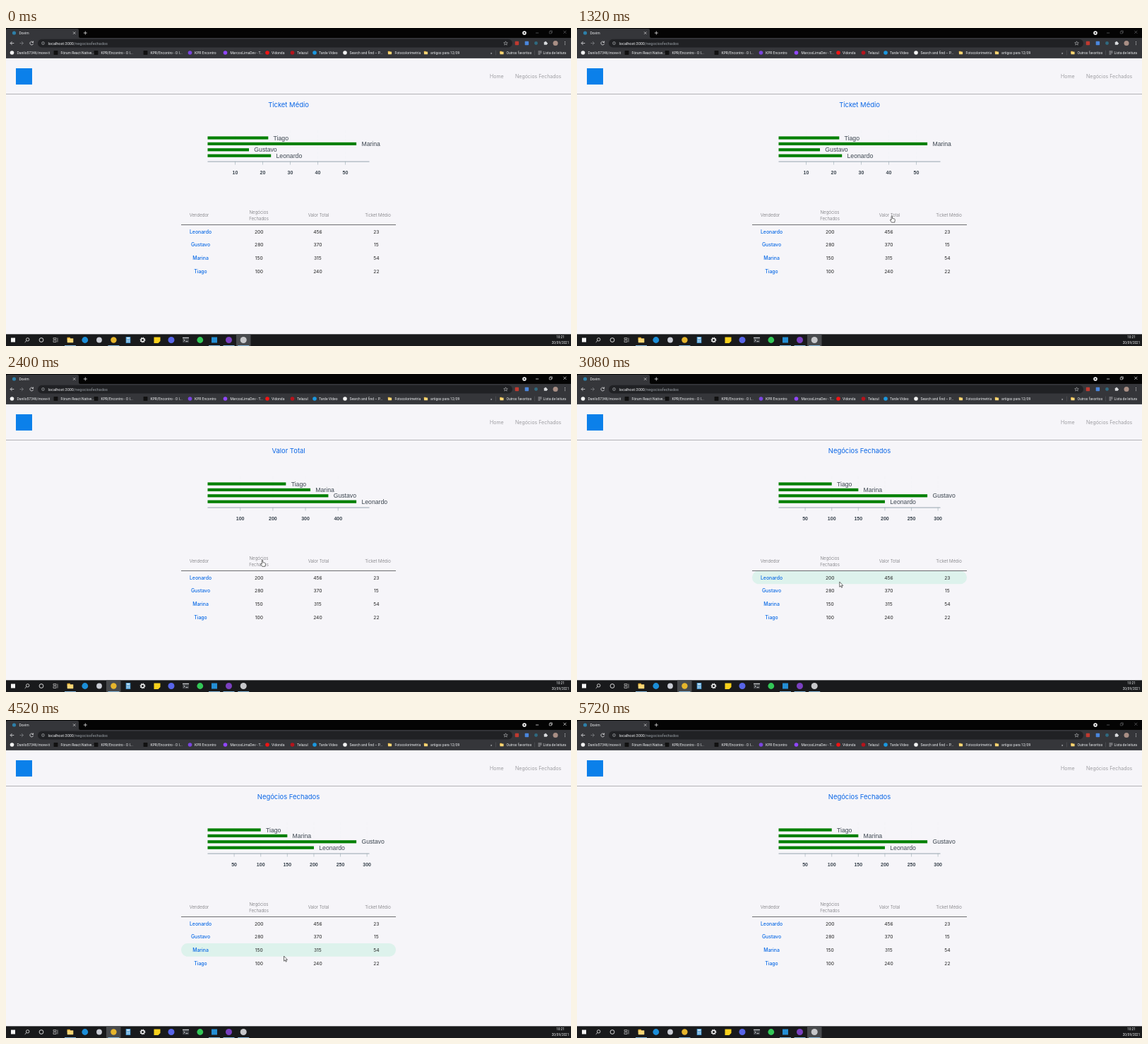
Animation of 800 by 450 pixels, one loop 5.76 s. Source, as an HTML page:

```html
<!DOCTYPE html>
<html lang="pt">
<head>
<meta charset="utf-8">
<title>Dovim</title>
<style>
  html, body { margin: 0; width: 100%; height: 100%; overflow: hidden; background: #f6f5f9; }
  svg { display: block; width: 800px; height: 450px; }
  text { white-space: pre; }
  .ui { font: 5px Roboto, sans-serif; fill: #eceef0; }
  .page { font-family: Inter, sans-serif; }
  .title { font-size: 9.45px; fill: #0a66e6; }
  .nav { font-size: 7.05px; font-weight: 300; fill: #86868a; }
  .head { font-size: 6.1px; font-weight: 300; fill: #707074; }
  .seller { font-size: 6.9px; font-weight: 500; fill: #0a6ae6; }
  .cell { font-size: 6.7px; fill: #222; }
  .label { font: 8.7px "Liberation Sans", Arial, sans-serif; fill: #3c4650; }
  .tick { font: bold 7px "Liberation Sans", Arial, sans-serif; fill: #3c4650; }
  .mid { text-anchor: middle; }
</style>
</head>
<body>
<svg id="stage" viewBox="0 0 800 450"></svg>
<script>
const NS = 'http://www.w3.org/2000/svg';
const LOOP = 5760;
const PAGE_TOP = 42.9, PAGE_END = 433.3;
const stage = document.getElementById('stage');

function add(parent, tag, attrs = {}, text) {
  const node = document.createElementNS(NS, tag);
  for (const key in attrs) node.setAttribute(key, attrs[key]);
  if (text !== undefined) node.textContent = text;
  parent.appendChild(node);
  return node;
}
const group = (parent = stage) => add(parent, 'g');
const rect = (p, x, y, width, height, fill, rx = 0) => add(p, 'rect', { x, y, width, height, fill, rx });
const dot = (p, cx, cy, r, fill) => add(p, 'circle', { cx, cy, r, fill });
const ring = (p, cx, cy, r, stroke, w = 0.8) =>
  add(p, 'circle', { cx, cy, r, fill: 'none', stroke, 'stroke-width': w });
const line = (p, d, stroke, w = 0.8) => add(p, 'path', { d, fill: 'none', stroke, 'stroke-width': w });
const write = (p, x, y, cls, text) => add(p, 'text', { x, y, class: cls }, text);
const show = (node, on) => { node.style.display = on ? '' : 'none'; };

function folder(p, x, y, s) {
  rect(p, x - s, y - s * 0.85, s, s, '#e0a92e', 0.4);
  rect(p, x - s, y - s * 0.55, s * 2, s * 1.4, '#f9d675', 0.4);
}

// Browser window
function drawTabs() {
  rect(stage, 0, 0, 800, 15, '#040404');
  rect(stage, 0, 14, 800, 30, '#35363a');
  add(stage, 'path', { d: 'M0 14V3Q0 1 2 1H101Q103 1 103 3V12Q103 14 105 14Z', fill: '#35363a' });
  dot(stage, 11.5, 7, 2.6, '#2d7fa8');
  write(stage, 18.5, 8.9, 'ui', 'Dovim');
  line(stage, 'M95 5.4l3.4 3.4M98.4 5.4l-3.4 3.4', '#d8d8da', 0.7);
  line(stage, 'M109.8 7h5M112.3 4.5v5', '#ddd');
  dot(stage, 734, 7, 2.8, '#eee');
  dot(stage, 734, 7, 1, '#111');
}

function drawToolbar() {
  rect(stage, 45, 15.8, 672, 11.7, '#202124', 5.8);
  line(stage, 'M11.3 21.5h-5M8.6 19l-2.5 2.5 2.5 2.5', '#e2e3e5');
  line(stage, 'M19.5 21.5h5M22 19l2.5 2.5-2.5 2.5', '#7d7f83');
  line(stage, 'M38.3 20.2a2.4 2.4 0 1 0 .3 2M38.6 18.5v2h-2', '#e2e3e5');
  ring(stage, 52.5, 21.5, 2, '#b4b7bb', 0.6);
  line(stage, 'M52.5 21.2v1.3M52.5 20.1v.5', '#b4b7bb', 0.6);
  const url = add(stage, 'text', { x: 59.5, y: 23.6, class: 'ui', style: 'font-size:5.55px' });
  add(url, 'tspan', {}, 'localhost:3000');
  add(url, 'tspan', { fill: '#9aa0a6' }, '/negociosfechados');
  line(stage, 'M707.5 18.8l.8 1.9 2 .1-1.6 1.3.6 2-1.8-1.1-1.8 1.1.6-2-1.6-1.3 2-.1z', '#d0d2d5', 0.5);
  rect(stage, 720.7, 18.8, 5.4, 5.4, '#bf3a30', 1);
  rect(stage, 734.7, 18.8, 5.4, 5.4, '#4a86dc', 0.8);
  dot(stage, 750.5, 21.5, 2.4, '#2f6a80');
  rect(stage, 761.8, 19.8, 4.2, 4, '#d8dadd', 0.5);
  dot(stage, 764, 19.6, 0.9, '#d8dadd');
  dot(stage, 766.2, 21.8, 0.9, '#d8dadd');
  dot(stage, 778, 21.5, 3.5, '#a98f85');
  for (const y of [19.5, 21.5, 23.5]) dot(stage, 791.5, y, 0.55, '#dcdde0');
}

function drawBookmarks() {
  const marks = [
    [8.5, '#f2f2f2', 'Danilo57346/move-it', 15.5],
    [70.5, '#111', 'Fórum React Native...', 77.5],
    [127.5, '#111', 'KPR/Encontro - O I...', 134.5],
    [197.5, '#111', 'KPR/Encontro - O I...', 204.5],
    [260.5, '#7a45e0', 'KPR Encontro', 267],
    [310.5, '#9146ff', 'MarcosLimaDev - T...', 317.5],
    [370, '#f01414', 'Vidonda', 376],
    [405.5, '#b5141c', 'Telazul', 412],
    [437, '#1a98e0', 'Tarde Vídeo', 443],
    [480, '#f2f2f2', 'Search and find – P...', 486.5],
    [543.5, 0, 'Fotocolorimetria', 550.5],
    [594.5, 0, 'artigos para 12/09', 601],
    [702, 0, 'Outros favoritos', 708.5]
  ];
  for (const [x, color, name, tx] of marks) {
    if (!color) folder(stage, x, 35, 2.6);
    else if (color === '#111') rect(stage, x - 2.9, 32.1, 5.8, 5.8, color, 0.5);
    else dot(stage, x, 35, 2.8, color);
    write(stage, tx, 36.8, 'ui', name);
  }
  write(stage, 686, 36.8, 'ui', '»');
  line(stage, 'M693.5 31.5v7M748.5 31.5v7', '#5d5e62', 0.5);
  line(stage, 'M753.5 33h5M753.5 35h5M753.5 37h3', '#d8dadd', 0.7);
  write(stage, 760.5, 36.8, 'ui', 'Lista de leitura');
}

function drawButtons(color) {
  const g = group();
  line(g, 'M750 7h4.2M789.3 3.8l4 4M793.3 3.8l-4 4', color, 0.7);
  line(g, 'M769.3 4.9h3v3h-3zM770.3 4.9v-1h3v3h-1', color, 0.6);
  return g;
}

// Page
const SELLERS = [
  ['Leonardo', 200, 456, 23],
  ['Gustavo', 280, 370, 15],
  ['Marina', 150, 315, 54],
  ['Tiago', 100, 240, 22]
];
const COLS = [275.5, 358.3, 441.4, 524.4];
const ROW_TOP = 279, ROW_H = 18.75;

function drawHeader() {
  rect(stage, 0, PAGE_TOP, 800, PAGE_END - PAGE_TOP, '#f6f5f9');
  rect(stage, 14, 57, 23, 23, '#0b80ea');
  write(stage, 685, 70.8, 'page nav', 'Home');
  write(stage, 721, 70.8, 'page nav', 'Negócios Fechados');
  rect(stage, 0, 93.1, 800, 0.8, '#a3a3a6');
}

function drawTable() {
  const heads = [[273.5, 267.2, 'Vendedor'], [358, 263.2, 'Negócios'], [358, 271.9, 'Fechados'],
    [442.5, 267.2, 'Valor Total'], [526.5, 267.2, 'Ticket Médio']];
  for (const [x, y, name] of heads) write(stage, x, y, 'page head mid', name);
  const hover = rect(stage, 248, 0, 304, ROW_H, '#ddf2ec', 9.2);
  rect(stage, 248, 278.1, 304, 0.8, '#4c4c4e');
  SELLERS.forEach((row, i) => row.forEach((value, c) =>
    write(stage, COLS[c], 290.5 + i * ROW_H, 'page mid ' + (c ? 'cell' : 'seller'), value)));
  return hover;
}

function drawChart(title, col, step, count) {
  const g = group();
  const left = 285.5;
  const scale = 210.6 / Math.max(...SELLERS.map(row => row[col]));
  write(g, 400, 111.5, 'page title mid', title);
  for (let i = 1; i <= count; i++) {
    const x = left + i * step * scale;
    line(g, `M${x} 145V189`, '#f1f2f5', 0.5).setAttribute('stroke-dasharray', '4 2');
    line(g, `M${x} 189v4.5`, '#9aabb4', 0.6);
    write(g, x, 206.9, 'tick mid', i * step);
  }
  rect(g, left, 188.6, 229, 0.9, '#8c9ca6');
  SELLERS.forEach((row, i) => {
    const y = 180.7 - i * 8.4, w = row[col] * scale;
    rect(g, left, y - 2.1, w, 4.2, '#008000');
    write(g, left + w + 7.3, y + 3.1, 'label', row[0]);
  });
  return g;
}

// Taskbar
function drawTaskbar() {
  rect(stage, 0, PAGE_END, 800, 17, '#191a1c');
  const browserOn = rect(stage, 142, PAGE_END, 20.5, 17, '#484a4d');
  const recorderOn = rect(stage, 326, PAGE_END, 20.5, 17, '#484a4d');
  for (const x of [91, 152.4, 295, 315.5, 336.2]) rect(stage, x - 8, 449, 16, 1, '#86b8dc');

  rect(stage, 7, 438.5, 6, 6, '#f4f4f4');
  ring(stage, 30.7, 440.8, 2.2, '#eee');
  line(stage, 'M29 442.5l-2.3 2.3', '#eee');
  ring(stage, 50, 441.5, 2.9, '#eee', 0.9);
  line(stage, 'M67 438.5h4v2h-4zM67 442h4v2.5h-4zM73 438.5v6', '#ddd', 0.6);
  folder(stage, 91, 441.5, 4.3);
  dot(stage, 111.8, 441.5, 4.4, '#1c8ed8');
  dot(stage, 132, 441.5, 3.9, '#c9ccd4');
  dot(stage, 152.4, 441.5, 4.2, '#e6b52c');

  rect(stage, 169.7, 437, 6.6, 9, '#4596cf', 0.5);
  rect(stage, 170.7, 438, 4.6, 1.7, '#e4f2fb');
  for (const y of [441, 443.2])
    for (const x of [170.7, 172.4, 174.1]) rect(stage, x, y, 1.2, 1.3, '#e4f2fb');
  ring(stage, 193.5, 441.5, 2.3, '#f0f0f0', 1.4);
  ring(stage, 193.5, 441.5, 3.4, '#f0f0f0', 1.1).setAttribute('stroke-dasharray', '1.34 1.33');
  add(stage, 'path', { d: 'M209.5 437.5h9v5.5l-3 3h-6z', fill: '#f8d11c' });
  dot(stage, 234, 441.5, 4.5, '#5865e8');
  rect(stage, 250, 437.8, 9, 7.5, '#3c3f43', 0.6);
  rect(stage, 250, 437.8, 9, 1.2, '#c8cacd');
  line(stage, 'M251.5 440.4l1.6 1.5-1.6 1.5M254.5 443.6h3', '#fff', 0.7);
  dot(stage, 274.8, 441.5, 4.4, '#33c757');
  rect(stage, 291, 437.5, 8, 8, '#248ed4');
  dot(stage, 315.5, 441.5, 4.5, '#7a40c0');
  dot(stage, 336.2, 441.5, 4.5, '#c6c7ca');
  const clock = { class: 'ui mid', style: 'font-size:4.65px', x: 785 };
  add(stage, 'text', { ...clock, y: 439.2 }, '10:21');
  add(stage, 'text', { ...clock, y: 447.2 }, '20/09/2021');
  return { browserOn, recorderOn };
}

function drawPointer(d) {
  const g = group();
  add(g, 'path', { d, fill: '#fff', stroke: '#222', 'stroke-width': 0.65, 'stroke-linejoin': 'round' });
  return g;
}

drawTabs();
drawToolbar();
drawBookmarks();
const dimButtons = drawButtons('#66676a');
const litButtons = drawButtons('#f4f4f4');
drawHeader();
const charts = [
  drawChart('Ticket Médio', 3, 10, 5),
  drawChart('Valor Total', 2, 100, 4),
  drawChart('Negócios Fechados', 1, 50, 6)
];
const hover = drawTable();
const bar = drawTaskbar();
const arrow = drawPointer('M0 0V7.2L1.7 5.7 2.8 8.2 3.9 7.7 2.8 5.3H5Z');
const hand = drawPointer('M-.7 .6Q0-.4 .7 .6V3.6L3.6 4.3Q4.6 4.6 4.5 5.7L3.9 9.3H-.3L-2.4 6.2Q-2.4 5.2-1.5 5.4L-.7 6.1Z');

// Pointer stops: time, x, y
const PATH = [
  [0, 752, 462], [120, 752, 462], [520, 719.5, 253.5], [680, 719.5, 253.5],
  [1280, 445.8, 265.8], [1840, 445.8, 265.8], [2320, 363, 263], [2690, 363, 263],
  [3240, 374, 302], [3320, 374, 302], [3700, 379.5, 307], [3900, 379.5, 307],
  [4480, 393.5, 334], [5080, 393.5, 334], [5560, 372, 462], [LOOP, 372, 462]
];
const VALUE_CLICK = 1480, DEALS_CLICK = 2440, LEAVE = 5720;

function pointerAt(t) {
  const i = PATH.findIndex(stop => stop[0] > t);
  const [t0, x0, y0] = PATH[i - 1], [t1, x1, y1] = PATH[i];
  const k = (t - t0) / (t1 - t0), e = k * k * (3 - 2 * k);
  return [x0 + (x1 - x0) * e, y0 + (y1 - y0) * e];
}

function draw(t) {
  const view = t < VALUE_CLICK ? 0 : t < DEALS_CLICK ? 1 : 2;
  charts.forEach((chart, i) => show(chart, i === view));

  const focused = t >= VALUE_CLICK && t < LEAVE;
  show(litButtons, focused);
  show(dimButtons, !focused);
  show(bar.browserOn, focused);
  show(bar.recorderOn, !focused);

  const [x, y] = pointerAt(t);
  const inside = x > 248 && x < 552;
  const onHead = y > 256 && y < 275 && COLS.slice(1).some(c => Math.abs(x - c) < 20);
  for (const p of [arrow, hand]) p.setAttribute('transform', `translate(${x} ${y})`);
  show(hand, onHead);
  show(arrow, !onHead);

  const row = Math.floor((y - ROW_TOP) / ROW_H);
  show(hover, inside && row >= 0 && row < 4);
  hover.setAttribute('y', ROW_TOP - 0.5 + row * ROW_H);
}

const start = performance.now();
function frame() {
  draw((performance.now() - start) % LOOP);
  requestAnimationFrame(frame);
}
frame();
</script>
</body>
</html>
```
